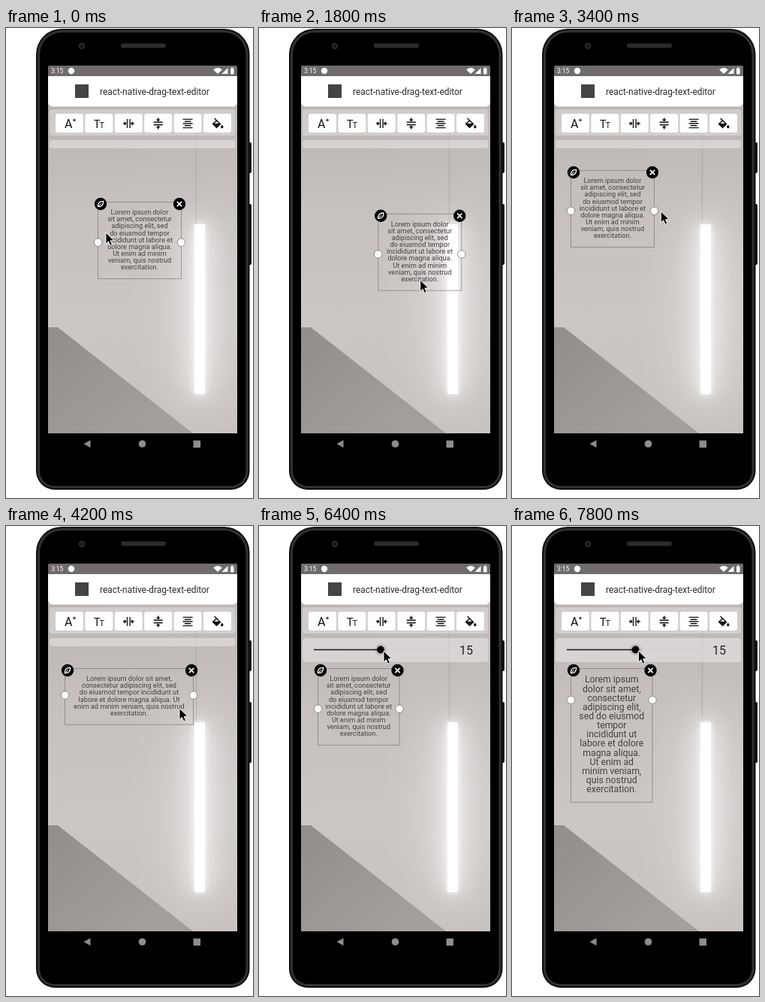
Recreate the animation shown at these times as an HTML page with a canvas. Size 329 by 625 pixels, loop 8 s.

```html
<!DOCTYPE html>
<html lang="en">
<head>
<meta charset="utf-8">
<title>Drag text editor</title>
<style>
html, body { margin: 0; width: 100%; height: 100%; overflow: hidden; background: #fff; }
canvas { display: block; width: 329px; height: 625px; }
</style>
</head>
<body>
<canvas id="stage" width="329" height="625"></canvas>
<script>
const ctx = document.getElementById('stage').getContext('2d');
const LOOP = 8000, STEP = 200, PAD = 10;
const INK = '#151515';

const NARROW = 'Lorem ipsum dolor|sit amet, consectetur|adipiscing elit, sed|do eiusmod tempor|incididunt ut labore et|dolore magna aliqua.|Ut enim ad minim|veniam, quis nostrud|exercitation.'.split('|');
const WIDE = 'Lorem ipsum dolor sit amet,|consectetur adipiscing elit, sed|do eiusmod tempor incididunt ut|labore et dolore magna aliqua. Ut|enim ad minim veniam, quis nostrud|exercitation.'.split('|');
const LARGE = 'Lorem ipsum|dolor sit amet,|consectetur|adipiscing elit,|sed do eiusmod|tempor|incididunt ut|labore et dolore|magna aliqua.|Ut enim ad|minim veniam,|quis nostrud|exercitation.'.split('|');
const WORDS = NARROW.join(' ').split(' ');

// Motion

const ramp = (t, from, to) => Math.min(1, Math.max(0, (t - from) / (to - from)));
const smooth = u => u * u * (3 - 2 * u);
const mix = (a, b, u) => a + (b - a) * u;
const mixPoint = (a, b, u) => a.map((v, i) => mix(v, b[i], u));

// The box is dragged around a loop before it is dropped further up.
function boxAt(t) {
  const u = ramp(t, 1200, 2200), turn = Math.PI * u;
  return [
    mix(122.5, 78.5, u) - 45 * Math.sin(2 * turn) + 40 * Math.sin(turn) ** 2,
    mix(231.5, 189.5, u) + 43 * Math.sin(turn)
  ];
}

function widthAt(t) {
  const pulled = mix(111, 205, ramp(t, 3400, 3800));
  return mix(pulled, 108.5, smooth(ramp(t, 3800, 4800)));
}

function thumbAt(t) {
  const u = ramp(t, 6800, 7800);
  return 162 + 2.5 * u - 18 * Math.sin(2 * Math.PI * u);
}

// The font size trails the slider by two steps.
const sizeAt = t => Math.max(12, Math.round(15 + 0.41 * (thumbAt(t - 2 * STEP) - 162)));

function cursorAt(t) {
  const rest = [98, 246], far = [288, 242], button = [125, 124];
  if (t < 2400) {
    const [x, y] = boxAt(t);
    return mixPoint([133, 272], [x + 56, y + 88], ramp(t, 0, 1200));
  }
  if (t < 3800) return mixPoint(rest, far, ramp(t, 2800, 3800) ** 1.25);
  if (t < 5200) return mixPoint(far, [174, 243], smooth(ramp(t, 3800, 4600)));
  return mixPoint(button, [thumbAt(t) + 4, 166], ramp(t, 5600, 6000));
}

// Drawing helpers

function rect(x, y, w, h, r, fill) {
  ctx.beginPath();
  ctx.roundRect(x, y, w, h, r);
  ctx.fillStyle = fill;
  ctx.fill();
}

function circle(x, y, r, fill, stroke) {
  ctx.beginPath();
  ctx.arc(x, y, r, 0, Math.PI * 2);
  ctx.fillStyle = fill;
  ctx.fill();
  if (stroke) { ctx.strokeStyle = stroke; ctx.lineWidth = 0.8; ctx.stroke(); }
}

function poly(points, fill) {
  ctx.beginPath();
  points.forEach(p => ctx.lineTo(...p));
  ctx.closePath();
  ctx.fillStyle = fill;
  ctx.fill();
}

function line(x1, y1, x2, y2, width, color) {
  ctx.beginPath();
  ctx.moveTo(x1, y1);
  ctx.lineTo(x2, y2);
  ctx.lineWidth = width;
  ctx.strokeStyle = color;
  ctx.stroke();
}

function label(text, x, y, size, color, align = 'left') {
  ctx.font = `${size}px Roboto, sans-serif`;
  ctx.textAlign = align;
  ctx.fillStyle = color;
  ctx.fillText(text, x, y);
}

function at(x, y, angle, draw) {
  ctx.save();
  ctx.translate(x, y);
  ctx.rotate(angle);
  draw();
  ctx.restore();
}

function linear(x1, y1, x2, y2, ...colors) {
  const g = ctx.createLinearGradient(x1, y1, x2, y2);
  colors.forEach((c, i) => g.addColorStop(i / (colors.length - 1), c));
  return g;
}

// Scene

function drawPhone() {
  rect(320, 152, 7, 41, 2, '#171717');
  rect(320, 234, 7, 81, 2, '#171717');
  rect(40, 1, 284.5, 613, [34, 34, 25, 25], '#0c0c0c');
  rect(42, 3, 280.5, 609, [32, 32, 23, 23], '#303232');
  rect(45, 6, 274.5, 603, [29, 29, 20, 20], '#000');
  rect(153, 20.5, 60, 6, 3, '#2b2b2b');
  circle(101, 24, 4.2, '#2a2a2a');
  circle(101, 24, 2, '#111');
  poly([[103.5, 553], [112.5, 548], [112.5, 558]], '#8d8d8d');
  circle(181.5, 553, 4.8, '#8d8d8d');
  rect(249.5, 548.5, 9.5, 9.5, 0.5, '#8d8d8d');
}

function drawRoom() {
  rect(56, 50, 252, 489, 0, linear(56, 90, 90, 539, '#b9b3b1', '#c6c1bf', '#ccc7c5', '#c8c3c0'));
  line(253.5, 140, 253.5, 262, 1.2, '#b0aaa8');
  for (const blur of [84, 56, 30, 10]) {
    ctx.shadowColor = '#fff';
    ctx.shadowBlur = blur;
    rect(251, 261, 14, 226, 2, '#fff');
  }
  ctx.shadowBlur = 0;
  poly([[56, 398], [69, 398], [249, 539], [56, 539]], linear(60, 398, 180, 539, '#928e8c', '#a39f9c'));
}

function drawStatus() {
  rect(56, 50, 252, 14, 0, '#6f6c6b');
  label('3:15', 60, 60, 8.5, '#fff');
  circle(87, 57, 4.2, '#fff');
  ctx.beginPath();
  ctx.moveTo(282, 61);
  ctx.arc(282, 61, 8, -Math.PI * 0.76, -Math.PI * 0.24);
  ctx.fillStyle = '#fff';
  ctx.fill();
  poly([[287.5, 61], [295.5, 53], [295.5, 61]], '#fff');
  rect(299, 53.5, 4.5, 8, 0.7, '#fff');
  rect(300.2, 52.5, 2, 1.2, 0, '#fff');
}

function sizeIcon() {
  label('A', -1.2, 5.5, 16, INK, 'center');
  line(4.5, -4.5, 8.5, -4.5, 1, INK);
  line(6.5, -6.5, 6.5, -2.5, 1, INK);
}

function fontIcon() {
  label('T', -2.7, 5.5, 15, INK, 'center');
  label('T', 4, 5.5, 11, INK, 'center');
}

function spacingIcon() {
  for (const s of [-1, 1]) {
    line(s * 1.8, -6, s * 1.8, 6, 1.4, INK);
    line(s * 7.5, 0, s * 4, 0, 1.5, INK);
    poly([[s * 2.6, 0], [s * 5.6, -3], [s * 5.6, 3]], INK);
  }
}

function lineHeightIcon() {
  ctx.rotate(Math.PI / 2);
  spacingIcon();
}

function alignIcon() {
  for (let i = -2; i <= 2; i++) {
    const half = i % 2 ? 4.3 : 6.5;
    line(-half, i * 2.8, half, i * 2.8, 1.4, INK);
  }
}

function bucketIcon() {
  poly([[-7, 0.5], [-1, -5], [5, 0.8], [-1, 6.5]], INK);
  poly([[-4, 0], [-1, -3], [2, 0]], '#fff');
  line(-4, -7, 0, -3, 1.4, INK);
  circle(6.3, 4.7, 1.7, INK);
  poly([[4.8, 4], [6.3, 1.4], [7.8, 4]], INK);
}

const ICONS = [sizeIcon, fontIcon, spacingIcon, lineHeightIcon, alignIcon, bucketIcon];

function drawToolbar() {
  rect(56, 64, 252, 40.5, [0, 0, 6, 6], '#fff');
  rect(92, 75, 18, 18, 0, '#444');
  label('react-native-drag-text-editor', 125, 89, 11.9, '#2a2a2a');
  rect(58, 108, 247.5, 35, 4, 'rgba(255,255,255,.3)');
  ICONS.forEach((icon, i) => {
    const x = 66 + i * 39.4;
    rect(x, 114, 37, 25, 3, '#fff');
    at(x + 18.5, 127, 0, icon);
  });
}

function drawSlider(t) {
  const open = t >= 5800, x = thumbAt(t);
  rect(58, 149, 247.5, open ? 32 : 11, 4, 'rgba(255,255,255,.36)');
  if (!open) return;
  line(x, 164.5, 251, 164.5, 0.8, '#c9c6c4');
  line(73, 164.5, x, 164.5, 1.4, INK);
  circle(x, 164.5, 8, 'rgba(0,0,0,.1)');
  circle(x, 164.5, 5, '#000');
  label('15', 276, 171, 16, '#222', 'center');
}

function wrap(width, px) {
  ctx.font = `${px}px Roboto, sans-serif`;
  return WORDS.reduce((lines, word) => {
    const last = lines.length - 1, joined = `${lines[last]} ${word}`;
    if (last >= 0 && ctx.measureText(joined).width <= width) lines[last] = joined;
    else lines.push(word);
    return lines;
  }, []);
}

function breakLines(width, size, px) {
  if (size > 15) return LARGE;
  if (size === 15 && width < 112) return NARROW;
  if (size === 15 && width > 150 && width < 180) return WIDE;
  return wrap(width - 2 * PAD, px);
}

function layout(t) {
  const width = widthAt(t), size = sizeAt(t);
  const px = size * 0.612, pitch = size * 0.607;
  const lines = breakLines(width, size, px);
  return { width, px, pitch, lines, height: lines.length * pitch + 2 * PAD };
}

function nibIcon() {
  ctx.beginPath();
  ctx.moveTo(-5.2, 0);
  ctx.quadraticCurveTo(0, -5.5, 5.2, 0);
  ctx.quadraticCurveTo(0, 5.5, -5.2, 0);
  ctx.strokeStyle = '#fff';
  ctx.lineWidth = 1.3;
  ctx.stroke();
  line(-5, 0, 1, 0, 1, '#fff');
}

function crossIcon() {
  line(-4.5, 0, 4.5, 0, 1.7, '#fff');
  line(0, -4.5, 0, 4.5, 1.7, '#fff');
}

function drawEditor(t) {
  const [x, y] = boxAt(t);
  const { width, height, px, pitch, lines } = layout(t);
  lines.forEach((text, i) =>
    label(text, x + width / 2, y + PAD + pitch * (i + 0.74), px, '#444241', 'center'));
  if (t >= 2400 && t < 2800) return;

  const right = x + width;
  ctx.strokeStyle = 'rgba(120,116,114,.65)';
  ctx.lineWidth = 1;
  ctx.strokeRect(x, y, width, height);

  // The handles follow the height of the preceding layout.
  const handleY = y + layout(t - STEP).height / 2 + 2.7;
  for (const hx of [x, right]) circle(hx, handleY, 5.2, '#fff', '#777');

  circle(x + 3.5, y + 2.5, 8.2, '#000');
  at(x + 3.5, y + 2.5, -Math.PI / 4, nibIcon);
  circle(right - 2.5, y + 2.5, 8.2, '#000');
  at(right - 2.5, y + 2.5, Math.PI / 4, crossIcon);
}

function drawCursor(t) {
  at(...cursorAt(t), 0, () => {
    poly([[0, 0], [0, 15], [3.4, 11.8], [5.8, 17.2], [8.4, 16], [6.1, 10.8], [10.8, 10.6]], '#000');
    ctx.strokeStyle = '#fff';
    ctx.lineWidth = 0.9;
    ctx.stroke();
  });
}

function drawScreen(t) {
  ctx.save();
  ctx.beginPath();
  ctx.roundRect(56, 50, 252, 489, [3, 3, 0, 0]);
  ctx.clip();
  drawRoom();
  drawStatus();
  drawToolbar();
  drawSlider(t);
  drawEditor(t);
  ctx.restore();
}

function frame() {
  const t = Math.floor(performance.now() % LOOP / STEP) * STEP;
  ctx.fillStyle = '#fff';
  ctx.fillRect(0, 0, 329, 625);
  drawPhone();
  drawScreen(t);
  drawCursor(t);
  requestAnimationFrame(frame);
}

frame();
</script>
</body>
</html>
```
